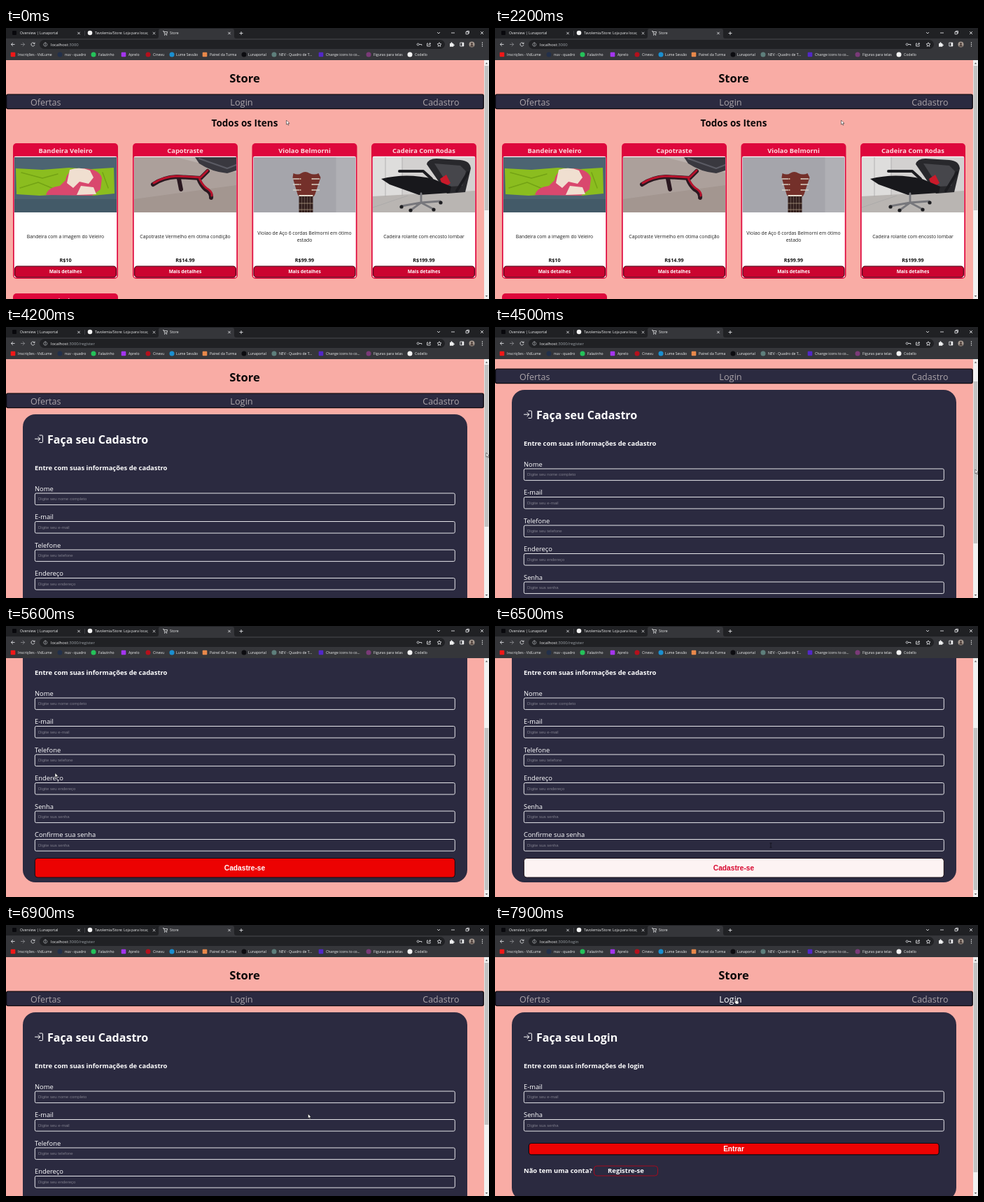
An HTML page that plays this animation: 690x388 px, repeating every 8000 ms.

```html
<!DOCTYPE html>
<html lang="pt-BR">
<head>
<meta charset="utf-8">
<title>Store</title>
<style>
html, body { margin: 0; width: 100%; height: 100%; overflow: hidden; background: #f9aca5; }
svg { display: block; width: 690px; height: 388px; }
text { font-family: "Open Sans", "Noto Sans", sans-serif; white-space: pre; }
.b { font-weight: 700; }
.arial { font-family: "Liberation Sans", Arial, sans-serif; }
.line { fill: none; stroke: #dcdde0; stroke-width: .9; }
</style>
</head>
<body>
<svg id="stage" viewBox="0 0 690 388" xmlns="http://www.w3.org/2000/svg"></svg>
<script>
const DARK = '#2b2a40', RED = '#de073c', LOOP = 8000;

// ---------- drawing helpers ----------
const rect = (x, y, w, h, fill, r = 0, more = '') =>
  `<rect x="${x}" y="${y}" width="${w}" height="${h}" rx="${r}" fill="${fill}" ${more}/>`;
const dot = (x, y, r, fill) => `<circle cx="${x}" cy="${y}" r="${r}" fill="${fill}"/>`;
const path = (d, more = 'class="line"') => `<path d="${d}" ${more}/>`;
const fill = c => `fill="${c}"`;
const pen = (c, w) => `fill="none" stroke="${c}" stroke-width="${w}" stroke-linecap="round" stroke-linejoin="round"`;
// y is the middle of the capitals
const text = (x, y, s, size, color, cls = '', anchor = 'start', id = '') =>
  `<text ${id && `id="${id}"`} class="${cls}" x="${x}" y="${(y + size * .36).toFixed(2)}" font-size="${size}" fill="${color}" text-anchor="${anchor}">${s}</text>`;
const mid = (x, y, s, size, color, cls = 'b', id = '') => text(x, y, s, size, color, cls, 'middle', id);

// ---------- browser frame ----------
function browser() {
  const cross = (x, y, r) => path(`M${x - r} ${y - r}l${2 * r} ${2 * r}m0 ${-2 * r}l${-2 * r} ${2 * r}`);
  const marks = [
    [10, 17, '#f01818', 'Inscrições - VidLume'], [77, 84, '#23304a', 'nuv - quadro'],
    [125, 132, '#25c25a', 'Falazinho'], [168, 175, '#a435f0', 'Aprelo'],
    [203, 210, '#b4101c', 'Cinevu'], [237, 243, '#1b8fd0', 'Lume Sessão'],
    [284, 291, '#e8884a', 'Painel da Turma'], [340, 346, '#0c0c10', 'Lunaportal'],
    [383, 390, '#5e7f7c', 'NEV - Quadro de T...'], [450, 457, '#5228c8', 'Change icons to co...'],
    [518, 525, '#7a3a78', 'Figuras para telas'], [577, 584, '#f4f4f4', 'Codello']
  ];
  const white = '#eeeff0';
  return rect(0, 0, 690, 46, '#202124')
    + path('M215 15q3 0 3-3V4q0-3 3-3h102q3 0 3 3v8q0 3 3 3z', fill('#35363a'))
    + rect(0, 15, 690, 31, '#35363a')
    + rect(48, 17, 579, 13, '#202124', 6.5)
    + rect(112, 4, .6, 7, '#55565a')
    + rect(9, 4, 6, 6, '#08080c', 1) + dot(120, 7, 3.3, '#f4f4f4')
    + path('M224 4.5h1.4l1.2 4h3.2l.8-3h-4.8', 'fill="none" stroke="#e6e7e9" stroke-width=".8"')
    + dot(226.8, 10, .7, white) + dot(229.5, 10, .7, white)
    + text(20, 7.2, 'Overview | Lunaportal', 5.2, white)
    + text(127, 7.2, 'Tavolemia/Store: Loja para locaç', 5.1, white)
    + text(234, 7.2, 'Store', 5.1, white)
    + rect(200, 2, 8, 11, 'url(#fade)')
    + cross(104, 7.5, 1.7) + cross(211.5, 7.5, 1.7) + cross(319, 7.5, 1.7)
    + path('M333.5 7.5h5M336 5v5')
    + path('M616 6l2 2 2-2M636 7h5M657 5.5h3.3v3.3h-3.3zM658.3 5.3v-1h3.2v3.3h-1') + cross(680, 7, 2)
    + path('M12.5 23.5h-5m2.3-2.4l-2.4 2.4 2.4 2.4')
    + path('M21.5 23.5h5m-2.3-2.4l2.4 2.4-2.4 2.4', pen('#85868a', .9))
    + path('M40.6 22.2a2.5 2.5 0 1 0 .3 1.9M41 20.7v1.8h-1.8')
    + path('M56.2 21a2.6 2.6 0 1 0 .01 0M56.2 23v2M56.2 21.9v.4', pen('#b4b6ba', .7))
    + `<text x="64" y="25.6" font-size="5.9" fill="#f0f0f1">localhost<tspan fill="#9aa0a6">:3000<tspan id="route"></tspan></tspan></text>`
    + path('M588.6 22a1.5 1.5 0 1 0 .01 0M590 23.5h3.8v1.6')
    + path('M603 22h-1.4v4h4.6v-1.5M603.2 24.4q.3-2 3.4-2m-1.5-1.5l1.6 1.5-1.6 1.5')
    + path('M619 20.8l.9 1.9 2 .2-1.5 1.4.4 2-1.8-1-1.8 1 .4-2-1.5-1.4 2-.2z')
    + path('M634 22h1.4q-.2-1.8 1.1-1.8t1.1 1.8h1.6v1.6q1.6-.1 1.6 1t-1.6 1v1.2H634z', fill(white))
    + path('M648.8 21h5v5h-5z') + rect(651.5, 21, 2.5, 5, white)
    + dot(665.5, 23.5, 4, '#a5998f') + dot(665.5, 22.5, 1.4, '#4a3c38')
    + path('M663 26.5q.4-2.4 2.5-2.4t2.5 2.4z', fill('#4a3c38'))
    + [21, 23.5, 26].map(y => dot(680.5, y, .65, white)).join('')
    + marks.map(([x, tx, c, s], i) =>
        (i % 3 ? dot(x, 38, 3.5, c) : rect(x - 3.3, 34.8, 6.6, 6.4, c, 1)) + text(tx, 38, s, 5.1, white)).join('');
}

// ---------- product pictures, drawn in a 146 x 79 box ----------
const photos = [
  rect(0, 0, 146, 79, '#4c6472') + rect(0, 60, 146, 19, '#435a68')
  + path('M2 16L40 18 78 15 110 17 142 15 143 52 112 55 70 53 36 55 3 53z', fill('#8bbd1f'))
  + path('M10 22l30 8 22-6M8 44l26-8 24 10M126 22l8 22', pen('#73a314', 1.5))
  + path('M45 54q3-11 20-13l8-8q2-16 24-17 24 0 28 14l-2 16-12 9z', fill('#d9486e'))
  + path('M79 18q15-5 29 1l5 10-7 9-13-3-9 9-9-7z', fill('#f0dfd0'))
  + path('M95 41l18 2 4 10-28 1z', fill('#f0dfd0')),

  rect(0, 0, 146, 79, '#aca09b') + path('M0 0h146v22L60 0z', fill('#bbb1ad'))
  + path('M0 60L146 40v39H0z', fill('#a39690'))
  + path('M87 0h59v19l-13 4q-22-2-40-14z', fill('#39383f'))
  + path('M93 2l40 14 13-5', pen('#5b5b64', 2))
  + path('M27 39q14-10 34-11l34 2 10-10M92 31q4 10 10 15 9 5 8 12M64 31l3 15', pen('#2a1820', 6))
  + path('M28 37q14-9 33-10l34 2 10-10M93 30q4 9 10 14 9 5 8 11', pen('#b8122c', 3)),

  rect(0, 0, 146, 79, '#a5a5ab') + rect(118, 0, 28, 79, '#b0b0b5')
  + path('M57 23q7 3 11 0 6-4 12 0 7 3 13 0l3 6-8 24q-1 3-4 4H68q-4-1-5-4l-7-24z', fill('#74302a'))
  + [31, 39, 47].map(y => path(`M57 ${y}h8m20 0h9`, pen('#d6d0c6', 1.4)) + dot(67, y, 1.1, '#d9c6ae') + dot(84, y, 1.1, '#d9c6ae')).join('')
  + rect(65, 54, 20, 25, '#34211f') + rect(65, 54, 20, 2, '#e6ddcf')
  + path('M69 56v23M73 56v23M77 56v23M81 56v23', pen('#8d7d73', .5)) + path('M65 66h20M65 75h20', pen('#bba68f', .7)),

  rect(0, 0, 146, 79, '#d3d1d0') + rect(0, 0, 42, 79, '#dedddc') + path('M0 56l146-8v31H0z', fill('#b9b5b2'))
  + path('M42 0v55M18 0v56M0 72l50-17', pen('#a9a7a7', .8))
  + path('M77 10q2-8 14-8l34 2q14 1 15 12l-8 34-26 2z', fill('#28282c'))
  + path('M88 9l37 3 8 8-5 21-19 1z', fill('#46464b'))
  + path('M96 31l9-6 6 12-10 7z', fill('#c91a2a'))
  + path('M12 31q36-9 74 0l26 11-2 9-44 3-42-15z', fill('#18181c'))
  + path('M38 20h34l12 11M120 48l16-26', pen('#1c1c20', 4))
  + path('M69 52v13M69 65l-28 5M69 65l-15 11M69 65l17 9M69 65l27-2', pen('#77777c', 2.8))
  + [[41, 71], [54, 76], [87, 75], [97, 65]].map(([x, y]) => dot(x, y, 2.6, '#1d1d20')).join('')
];

function card(x, y, title, lines, price, photo) {
  const c = x + 75;
  return rect(x, y, 150, 194, RED, 5) + rect(x + 1.7, y + 18.8, 146.6, 173.5, '#fff', 2)
    + mid(c, y + 10.7, title, 9.4, '#ffd9dc')
    + `<g transform="translate(${x + 2} ${y + 20})" clip-path="url(#photo)">${photo}</g>`
    + lines.map((s, i) => mid(c, y + 134 + (i - (lines.length - 1) / 2) * 10, s, 6.8, '#1c1c1c', '')).join('')
    + mid(c, y + 167, price, 7.2, '#111')
    + rect(x + 2.6, y + 176.2, 144.8, 15.6, '#cb0430', 4, 'stroke="#5e0018" stroke-width="1.3"')
    + mid(c, y + 184, 'Mais detalhes', 6.75, '#fff');
}

function home() {
  return mid(341, 136.3, 'Todos os Itens', 13.5, '#0b0708')
    + card(10, 165, 'Bandeira Veleiro', ['Bandeira com a imagem do Veleiro'], 'R$10', photos[0])
    + card(181, 165, 'Capotraste', ['Capotraste Vermelho em ótima condição'], 'R$14.99', photos[1])
    + card(351.5, 165, 'Violao Belmorni', ['Violao de Aço 6 cordas Belmorni em ótimo', 'estado'], 'R$99.99', photos[2])
    + card(522, 165, 'Cadeira Com Rodas', ['Cadeira rolante com encosto lombar'], 'R$199.99', photos[3])
    + card(10, 380, 'Lixeira', [], '', '');
}

// ---------- forms ----------
const field = ([label, hint], i) => {
  const y = 238 + 40.5 * i;
  return text(41, y - 6.4, label, 9.35, '#fff')
    + rect(41.3, y, 600, 16.6, DARK, 2, 'stroke="#e6e6ea" stroke-width="1"')
    + text(46, y + 8, hint, 6, '#7d7c89', 'arial');
};
const panel = (bottom, word, fields) =>
  rect(24, 125, 635, bottom - 125, DARK, 18)
  + path('M48 155h3.4q1 0 1 1v8.5q0 1-1 1H48M41.5 160.2h7M46 157.5l2.7 2.7-2.7 2.7', pen('#fff', 1))
  + text(59, 161, 'Faça seu ' + word, 16.05, '#fff', 'b')
  + text(41, 201.3, `Entre com suas informações de ${word.toLowerCase()}`, 9.41, '#fff', 'b')
  + fields.map(field).join('');

const register = () => panel(502, 'Cadastro', [
    ['Nome', 'Digite seu nome completo'], ['E-mail', 'Digite seu e-mail'],
    ['Telefone', 'Digite seu telefone'], ['Endereço', 'Digite seu endereço'],
    ['Senha', 'Digite sua senha'], ['Confirme sua senha', 'Digite sua senha']])
  + rect(41.3, 467.5, 600, 27.5, '#ec0202', 4, 'id="send" stroke="#150a12" stroke-width="1"')
  + mid(341, 481.3, 'Cadastre-se', 10.2, '#fff', 'b arial', 'sendText');

const login = () => panel(394, 'Login', [['E-mail', 'Digite seu e-mail'], ['Senha', 'Digite sua senha']])
  + rect(48.3, 312.5, 586, 16.4, '#ec0202', 4, 'stroke="#0c0810" stroke-width="1.2"')
  + mid(341, 320.8, 'Entrar', 10.1, '#fff', 'b arial')
  + text(41, 352, 'Não tem uma conta?', 9.45, '#fff', 'b')
  + rect(141.5, 345, 91, 14, DARK, 4, 'stroke="#a30a1e" stroke-width="1"')
  + mid(187, 352, 'Registre-se', 9.45, '#fff');

const LINK = '#aaa3a8';
const header = mid(341, 72, 'Store', 16.6, '#0b0708')
  + rect(.6, 95.2, 681.6, 20.4, DARK, 2, 'stroke="#08070c" stroke-width="1.3"')
  + text(35, 106.3, 'Ofertas', 12.5, LINK)
  + mid(336.5, 106.3, 'Login', 12.8, LINK, '', 'toLogin')
  + text(647.5, 106.3, 'Cadastro', 12.5, LINK, '', 'end', 'toRegister');

const cursors = {
  arrow: path('M0 0v6.2l1.5-1.3 1 2.3 1-.4-1-2.3h2z', 'fill="#fff" stroke="#111" stroke-width=".5"'),
  hand: path('M-.6 0q.7-.7 1.3 0v2.6l2.6.6q.9.3.8 1.2l-.6 2.7H.3L-1.9 4.4q0-.9 1.3-.3z', 'fill="#fff" stroke="#111" stroke-width=".4"'),
  beam: path('M-1.2-3h2.4M0-3v6M-1.2 3h2.4', pen('#12121c', .8))
};

const stage = document.getElementById('stage');
stage.innerHTML = `<defs>
  <clipPath id="view"><rect y="46" width="683" height="342"/></clipPath>
  <clipPath id="photo"><rect width="146" height="79"/></clipPath>
  <linearGradient id="fade"><stop stop-color="#202124" stop-opacity="0"/><stop offset=".8" stop-color="#202124"/></linearGradient>
  </defs>`
  + rect(0, 46, 690, 342, '#f9aca5')
  + `<g clip-path="url(#view)"><g id="scroll">${header}
     <g id="home">${home()}</g><g id="register">${register()}</g><g id="login">${login()}</g></g></g>`
  + rect(683, 46, 7, 342, '#f1f1f1')
  + path('M684.8 51.5l1.7-2 1.7 2zM684.8 383l1.7 2 1.7-2z', fill('#555'))
  + rect(683.7, 54, 5.6, 207, '#c1c1c1', 0, 'id="thumb"')
  + browser()
  + `<g id="cursor">${Object.entries(cursors).map(([k, s]) => `<g id="${k}">${s}</g>`).join('')}</g>`;

// ---------- motion ----------
const $ = id => document.getElementById(id);
const show = (id, on) => $(id).setAttribute('visibility', on ? 'visible' : 'hidden');
const ease = (t, a, b) => {
  const k = Math.min(1, Math.max(0, (t - a) / (b - a)));
  return k * k * (3 - 2 * k);
};
const mix = (a, b, k) => `rgb(${a.map((v, i) => Math.round(v + (b[i] - v) * k))})`;

// the pointer opens the form, drags the scrollbar, tries the button, then goes to the login
const track = [
  [0, 400.5, 132], [800, 595, 253], [1100, 595, 253], [1400, 509, 123], [1800, 509, 123],
  [2200, 494.5, 132], [2700, 561, 119], [3200, 618, 106], [3400, 618, 106], [4200, 686, 180],
  [4300, 686, 180], [4900, 686, 272], [5100, 679, 272], [5600, 70, 210.5], [6000, 300, 345],
  [6300, 392, 346], [6500, 394, 314], [6900, 431.5, 270.5], [7500, 344, 106], [8000, 344, 106]
];
function pointer(t) {
  const i = track.findIndex((p, n) => n && t <= p[0]);
  const [a, x, y] = track[i - 1], [b, u, v] = track[i], k = ease(t, a, b);
  return [x + (u - x) * k, y + (v - y) * k];
}

const thumbs = { home: 207, register: 232, login: 300 };
const pageAt = t => t < 3400 ? 'home' : t < 7800 ? 'register' : 'login';

function draw(now) {
  const t = Math.floor((now % LOOP) / 100) * 100;
  const page = pageAt(t);
  const route = pageAt(t - 100); // the address follows one step later
  const top = 135 * (ease(t, 4300, 4900) - ease(t, 6500, 6900));
  const [x, y] = pointer(t), py = y + top;

  for (const id in thumbs) show(id, id === page);
  $('route').textContent = route === 'home' ? '' : '/' + route;
  $('scroll').setAttribute('transform', `translate(0 ${-top})`);
  $('thumb').setAttribute('height', thumbs[page]);
  $('thumb').setAttribute('y', 54 + top * 92 / 135);

  const onNav = py > 98 && py < 114;
  const overLogin = onNav && x > 319 && x < 354, overRegister = onNav && x > 594 && x < 648;
  $('toLogin').setAttribute('fill', overLogin ? '#fff' : LINK);
  $('toRegister').setAttribute('fill', overRegister ? '#fff' : LINK);

  const hot = ease(t, 5900, 6100) - ease(t, 6500, 6700);
  $('send').setAttribute('fill', mix([236, 2, 2], [253, 243, 243], hot));
  $('sendText').setAttribute('fill', mix([255, 255, 255], [216, 8, 48], hot));

  const row = (py - 238) / 40.5;
  const onForm = page !== 'home' && x > 41 && x < 642;
  const overField = onForm && row >= 0 && row < (page === 'login' ? 2 : 6) && row % 1 < .42;
  const overSend = page === 'register' && onForm && py > 467 && py < 495;
  const kind = overField ? 'beam' : overLogin || overRegister || overSend ? 'hand' : 'arrow';
  for (const k in cursors) show(k, k === kind);
  $('cursor').setAttribute('transform', `translate(${x} ${y})`);
}

const start = performance.now();
function tick() {
  draw(performance.now() - start);
  requestAnimationFrame(tick);
}
tick();
</script>
</body>
</html>
```
